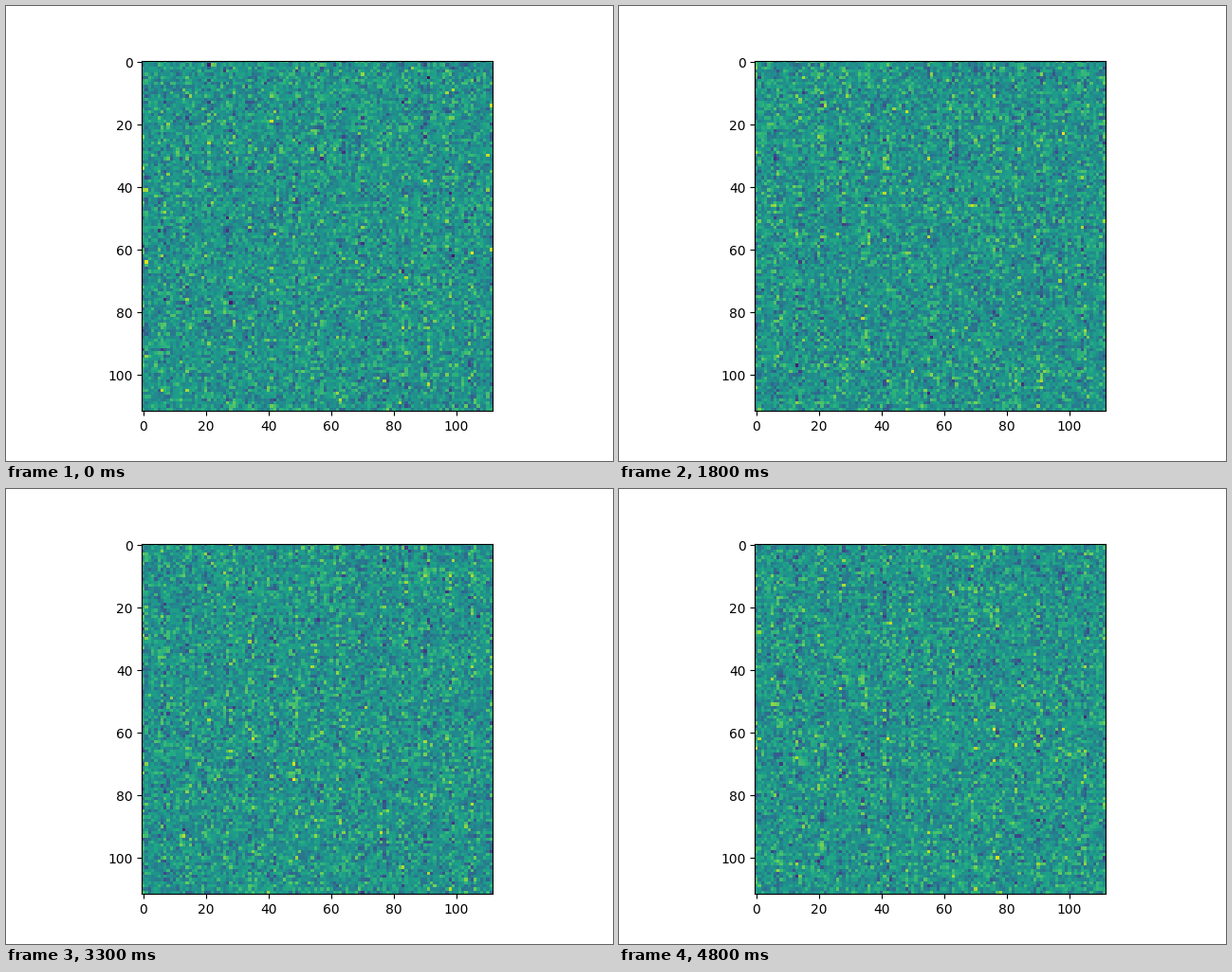
These frames come from a looping animation (640x480 px, 4.9 s). A matplotlib script:

```python
import numpy as np
import matplotlib.pyplot as plt
from matplotlib.animation import FuncAnimation

SIZE = 112
FRAMES = 49
INTERVAL = 100
PERIOD = 7

# Noise is stronger in columns near each multiple of the period.
cols = np.arange(SIZE)
spread = 1 + 0.28 * np.cos(2 * np.pi * (cols + 0.4) / PERIOD)


def noise(i):
    rng = np.random.default_rng(700 + i)
    return rng.normal(size=(SIZE, SIZE)) * spread


fig, ax = plt.subplots(figsize=(6.4, 4.8), dpi=100)
# Fixed limits keep the overall tone steady from frame to frame.
im = ax.imshow(noise(0), cmap="viridis", vmin=-5.0, vmax=4.6)


def update(i):
    im.set_data(noise(i))
    return [im]


anim = FuncAnimation(fig, update, frames=FRAMES, interval=INTERVAL,
                     repeat=True, repeat_delay=0, blit=False)
plt.show()
```
